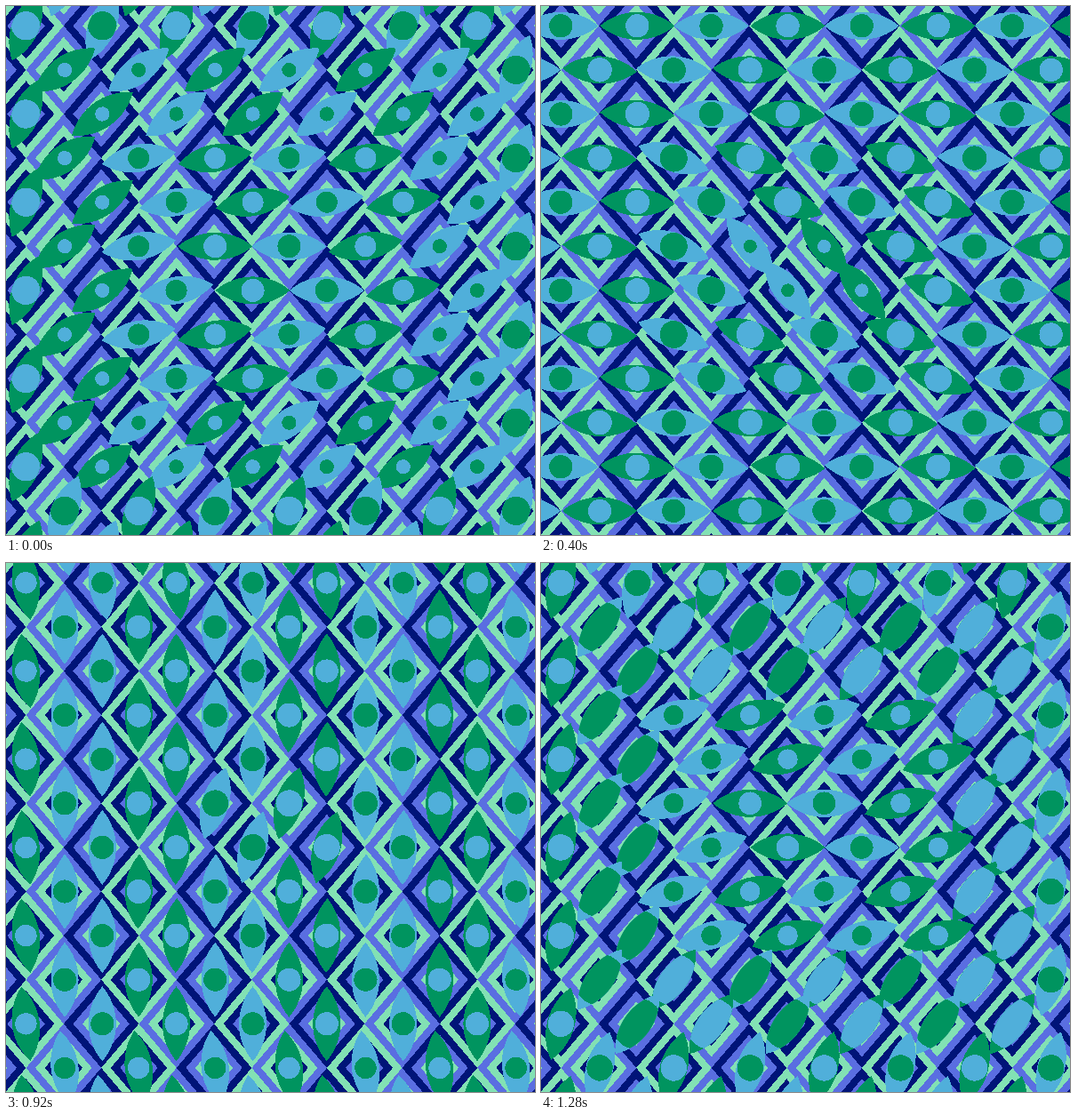
An HTML page that plays this animation: 595x595 px, repeating every 1320 ms.

```html
<!DOCTYPE html>
<html>
<head>
<meta charset="utf-8">
<title>Turning eyes</title>
<style>
html, body { margin: 0; width: 100%; height: 100%; overflow: hidden; background: #001478; }
svg { display: block; width: 100vw; height: 100vh; }
</style>
</head>
<body>
<svg id="stage" viewBox="0 0 595 595" shape-rendering="crispEdges"></svg>
<script>
const NS = 'http://www.w3.org/2000/svg';
const stage = document.getElementById('stage');
const LOOP = 1320, HALF = LOOP / 2, STEP = 40;
const SWAP = 395;       // moment the pupil becomes the new eye
const RING_DELAY = 123; // the turn spreads outwards ring by ring
const DX = 42.3, DY = 49.6;
const LENGTH = 42, WIDTH = 15.5;
const EYE = ['#00945f', '#50afda'];
const BANDS = ['#5a6ee1', '#82e1b4', '#001478'];

function set(el, attrs) {
  for (const k in attrs) el.setAttribute(k, attrs[k]);
}

function make(tag, attrs, parent) {
  const el = document.createElementNS(NS, tag);
  set(el, attrs);
  return parent.appendChild(el);
}

const mod = (a, n) => ((a % n) + n) % n;
const colX = c => 297.5 + DX * (c - 5.5);
const rowY = r => 295.1 + DY * (r - 5.5);

function lens(l, h) {
  const r = (l * l + h * h) / (2 * h);
  return `M${-l} 0A${r} ${r} 0 0 1 ${l} 0A${r} ${r} 0 0 1 ${-l} 0Z`;
}

// quarter turn: speeds up to the swap, then slows down
function turnAngle(s) {
  const span = s < SWAP ? 275 : 210;
  const near = Math.max(0, 1 - Math.abs(s - SWAP) / span);
  const a = 40 * near ** 1.3;
  return s < SWAP ? a : 90 - a;
}

// appears small, rests, then swells until it fills the eye
function pupilRadius(s) {
  const w = 2 * mod(s - SWAP, HALF) / HALF - 1;
  return 13.3 * Math.exp(0.1 * w + 0.75 * w ** 5 + 0.25 * w ** 8);
}

const lid = lens(LENGTH, WIDTH);
const defs = make('defs', {}, stage);
make('path', { d: lid }, make('clipPath', { id: 'lid' }, defs));
const back = make('g', {}, stage);
const front = make('g', {}, stage);

function diamond(c, r) {
  const x = colX(c), y = rowY(r);
  for (let n = 0; n < 3; n++) {
    const w = DX * (1 - n / 4), h = DY * (1 - n / 4);
    make('path', {
      d: `M${x - w} ${y}L${x} ${y - h}L${x + w} ${y}L${x} ${y + h}Z`,
      fill: BANDS[mod(n - c, 3)]
    }, back);
  }
}

function eye(c, r) {
  const i = Math.floor(c / 2), j = Math.floor((r - 1) / 2), odd = mod(i, 2);
  const g = make('g', {}, front);
  return {
    x: colX(c) + 1.2 - 1.4 * odd,
    y: rowY(r),
    odd,
    ring: Math.max(Math.abs(i - 2.5) - 0.5, Math.abs(j - 2)),
    g,
    white: make('path', { d: lid }, g),
    pupil: make('circle', { 'clip-path': 'url(#lid)' }, g)
  };
}

const eyes = [];
for (let r = -1; r <= 12; r++) {
  for (let c = -2; c <= 13; c++) {
    if (mod(c + r, 2) === 0) continue;
    diamond(c, r);
    eyes.push(eye(c, r));
  }
}

function draw(time) {
  const t = Math.floor(mod(time, LOOP) / STEP) * STEP;
  for (const e of eyes) {
    const local = t - e.ring * RING_DELAY;
    const turn = Math.floor(local / HALF);
    const s = local - turn * HALF;
    const tone = mod(e.odd + turn + (s >= SWAP ? 1 : 0), 2);
    set(e.g, { transform: `translate(${e.x} ${e.y}) rotate(${90 * turn + turnAngle(s)})` });
    set(e.white, { fill: EYE[tone] });
    set(e.pupil, { r: pupilRadius(s), fill: EYE[1 - tone] });
  }
}

const start = performance.now();
function frame() {
  draw(performance.now() - start);
  requestAnimationFrame(frame);
}
draw(0);
requestAnimationFrame(frame);
</script>
</body>
</html>
```
